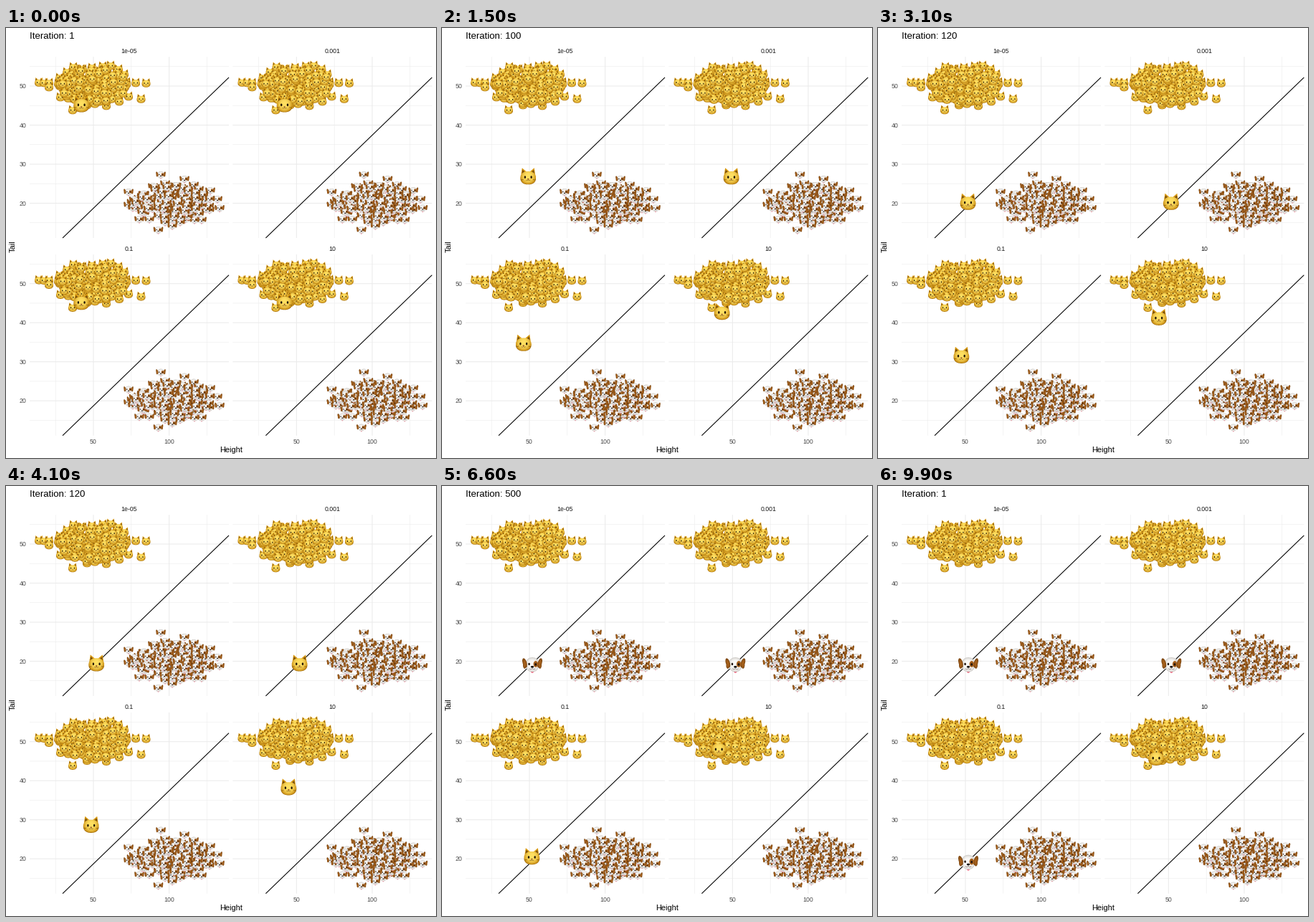
Animation, 600 px wide and 600 px high, one loop 10000 ms. Source, as a matplotlib script:

```python
import matplotlib.pyplot as plt
import numpy as np
from matplotlib.animation import FuncAnimation

SIZE, DPI, FRAMES = 600, 100, 100
PX = 72 / DPI
PERIOD, HOLD, SWITCH = FRAMES / 6, 4.8, 11.1
SS = 4

plt.rcParams["font.family"] = "Liberation Sans"
fig = plt.figure(figsize=(SIZE / DPI, SIZE / DPI), dpi=DPI, facecolor="white")
ax = fig.add_axes([0, 0, 1, 1])
ax.axis("off")

STATES = [1, 100, 120, 200, 500, 1000]
DOG = None
NEAR = [0, 117.3, 141, DOG, DOG, DOG]
# name, left shift, top shift, distance walked at each state
PANELS = [
    ("1e-05", 0, 0, NEAR),
    ("0.001", 283.4, 0, NEAR),
    ("0.1", 0, 275.7, [0, 67, 76.6, 135, DOG, DOG]),
    ("10", 283.4, 275.7, [0, 16.2, 23, 86, -21.6, -39]),
]

CAT_EDGE = [(46, 75.5), (53, 76), (60, 76), (60, 82), (73, 77), (75, 69), (76, 96),
            (85, 61), (94, 54), (107, 57), (120, 55), (135, 53), (146, 52), (157, 57),
            (165, 64), (168, 75), (181, 76), (195.5, 76.5), (188.5, 98.5), (171, 95),
            (158, 102), (140, 108), (113, 107), (93, 114)]
DOG_EDGE = [(171, 229), (171, 247), (177, 251), (186, 267), (200, 267), (205, 221),
            (216, 205), (212.5, 282), (222, 217), (232, 276), (222, 271), (236, 220),
            (249, 211), (262, 219), (269, 225), (285, 227), (295, 239), (298, 251.5),
            (284, 254), (273, 268), (263, 268), (250, 267), (243, 271)]


def rgb(code):
    return np.array([int(code[i:i + 2], 16) for i in (1, 3, 5)]) / 255


def ellipse(x, y, cx, cy, rx, ry, p=2):
    return np.abs((x - cx) / rx) ** p + np.abs((y - cy) / ry) ** p


def triangle(x, y, a, b, c):
    def side(p, q):
        return (x - p[0]) * (q[1] - p[1]) - (y - p[1]) * (q[0] - p[0])
    s, t, u = side(a, b), side(b, c), side(c, a)
    return ((s >= 0) & (t >= 0) & (u >= 0)) | ((s <= 0) & (t <= 0) & (u <= 0))


def fill(img, mask, color):
    color = rgb(color) if isinstance(color, str) else color[mask]
    img[mask, :3] = color
    img[mask, 3] = 1


def shade(t, inner, outer):
    t = np.clip(t, 0, 1)[..., None]
    return rgb(inner) * (1 - t) + rgb(outer) * t


def cat(img, x, y):
    m = np.abs(x)
    fill(img, triangle(m, y, (0.95, 0.05), (0.78, -1.08), (0.16, -0.55)), "#d99a12")
    fill(img, triangle(m, y, (0.84, -0.2), (0.72, -0.84), (0.36, -0.5)), "#7a4f0c")
    head = ellipse(x, y, 0, 0.2, 1, 0.84, 2.3)
    glow = ellipse(x, y, 0, -0.02, 1.05, 1.08)
    fill(img, head < 1, shade(glow ** 1.3, "#ffe062", "#c4860c"))
    fill(img, (head < 1) & (head > 0.86) & (y > 0.3), "#a06a08")
    whisker = (m > 0.62) & (m < 0.95) & (np.abs(y - 0.42 - 0.12 * (m - 0.6)) < 0.035)
    fill(img, whisker, "#8a5c0a")
    fill(img, ellipse(m, y, 0.4, 0.1, 0.11, 0.17) < 1, "#1f1405")
    fill(img, ellipse(x, y, 0, 0.34, 0.11, 0.07) < 1, "#8d4a26")
    ring = ellipse(m, y, 0.14, 0.42, 0.14, 0.14)
    fill(img, (ring < 1) & (ring > 0.5) & (y > 0.44), "#5e3c08")


def dog(img, x, y):
    m = np.abs(x)
    head = ellipse(x, y, 0, -0.02, 0.72, 0.78, 2.2)
    fill(img, ellipse(x, y, 0, 0.68, 0.17, 0.2) < 1, "#ee6f86")
    fill(img, head < 1, shade(head ** 2, "#fbfaf8", "#c9c6c2"))
    ear = ellipse(m + 0.25 * y, y, 0.76, -0.2, 0.23, 0.5)
    ear = np.minimum(ear, ellipse(m, y, 0.82, 0.05, 0.18, 0.36))
    fill(img, ear < 1, shade(ear, "#a8621c", "#73400e"))
    patch = ellipse(x, y, 0.36, -0.08, 0.24, 0.34)
    fill(img, patch < 1, shade(patch, "#8f4f15", "#b56f2a"))
    fill(img, ellipse(x, y, -0.34, -0.08, 0.1, 0.13) < 1, "#1c120c")
    fill(img, ellipse(x, y, 0.36, -0.04, 0.1, 0.13) < 1, "#1c120c")
    fill(img, ellipse(x, y, 0, 0.22, 0.17, 0.11) < 1, "#15100e")
    ring = ellipse(m, y, 0.16, 0.34, 0.17, 0.17)
    fill(img, (ring < 1) & (ring > 0.6) & (y > 0.38), "#54463e")


def stamp(layer, draw, cx, cy, r):
    """Paint one face, antialiased, on a premultiplied RGBA layer."""
    h = int(r * 1.15) + 2
    x0, y0, n = int(cx) - h, int(cy) - h, 2 * h + 1
    sub = (np.arange(n * SS) + 0.5) / SS
    x, y = np.meshgrid((x0 + sub - cx) / r, (y0 + sub - cy) / r)
    img = np.zeros((n * SS, n * SS, 4))
    draw(img, x, y)
    img = img.reshape(n, SS, n, SS, 4).mean(axis=(1, 3))
    spot = layer[y0:y0 + n, x0:x0 + n]
    spot[:] = img + spot * (1 - img[..., 3:])


def to_image(layer):
    out = layer.copy()
    out[..., :3] /= np.maximum(layer[..., 3:], 1e-6)
    return (np.clip(out, 0, 1) * 255 + 0.5).astype(np.uint8)


def cloud(rng, edge, n, cx, cy, rx, ry):
    angle = rng.uniform(0, 2 * np.pi, n)
    dist = np.sqrt(rng.uniform(0, 1, n))
    inner = np.column_stack([cx + rx * dist * np.cos(angle), cy + ry * dist * np.sin(angle)])
    return edge + [tuple(p) for p in inner]


def line(xs, ys, width, color, z):
    ax.plot(xs, ys, color=color, lw=width * PX, zorder=z, snap=False,
            solid_capstyle="butt")


def label(x, y, s, size, color="black", **kw):
    kw = {"ha": "center", "va": "baseline", **kw}
    return ax.text(x, y, s, fontsize=size * PX, color=color, **kw)


def height_px(v):
    return 122 + (v - 50) * 2.112


def tail_px(v):
    return 81 + (50 - v) * 5.45


def draw_panel(name, dx, dy):
    left, right, top, bottom = 33 + dx, 311 + dx, 40.3 + dy, 293 + dy
    for v in range(15, 56, 5):
        y = tail_px(v) + dy
        line([left, right], [y, y], 0.53 if v % 10 else 1.07, "#ebebeb", 1)
    for v in range(25, 126, 25):
        x = height_px(v) + dx
        line([x, x], [top, bottom], 0.53 if v % 50 else 1.07, "#ebebeb", 1)
    line([79 + dx, right], [bottom, 69 + dy], 1.07, "black", 2)
    label(172 + dx, 35 + dy, name, 8.8, "#1a1a1a")
    if dx == 0:
        for v in range(20, 51, 10):
            label(28.4, tail_px(v) + dy + 3.2, str(v), 8.8, "#4d4d4d", ha="right")
    if dy > 0:
        for v in (50, 100):
            label(height_px(v) + dx, 580, str(v), 8.8, "#4d4d4d")


rng = np.random.default_rng(7)
cats = cloud(rng, CAT_EDGE, 150, 121, 80, 48, 26)
dogs = cloud(rng, DOG_EDGE, 135, 231, 243.5, 57, 24)

base = np.zeros((SIZE, SIZE, 4))
for name, dx, dy, _ in PANELS:
    draw_panel(name, dx, dy)
    for x, y in cats:
        stamp(base, cat, x + dx, y + dy, 6)
    for x, y in dogs:
        stamp(base, dog, x + dx, y + dy, 6.4)

title = label(33, 15, "", 13.2, ha="left")
label(313.8, 592, "Height", 11)
label(9.3, 304.5, "Tail", 11, rotation=90, va="center")
faces = ax.imshow(to_image(base), extent=(0, SIZE, SIZE, 0), aspect="auto",
                  interpolation="nearest", zorder=3)
ax.set_xlim(0, SIZE)
ax.set_ylim(SIZE, 0)


def update(i):
    k = int(i / PERIOD)
    phase = i - k * PERIOD
    nxt = (k + 1) % len(STATES)
    frac = max(0, (phase - HOLD) / (PERIOD - HOLD))
    title.set_text(f"Iteration: {STATES[nxt if phase > SWITCH else k]}")
    layer = base.copy()
    for _, dx, dy, walk in PANELS:
        a, b = walk[k], walk[nxt]
        if a is DOG:
            stamp(layer, dog, 126 + dx, 249.5 + dy, 13)
            continue
        # a cat about to turn into a dog waits in place
        d = a if b is DOG else a + (b - a) * frac
        stamp(layer, cat, 105.2 + 0.149 * d + dx, 106.2 + d + dy, 10.9)
    faces.set_data(to_image(layer))
    return faces, title


anim = FuncAnimation(fig, update, frames=FRAMES, interval=100, repeat=True, repeat_delay=0)
plt.show()
```
